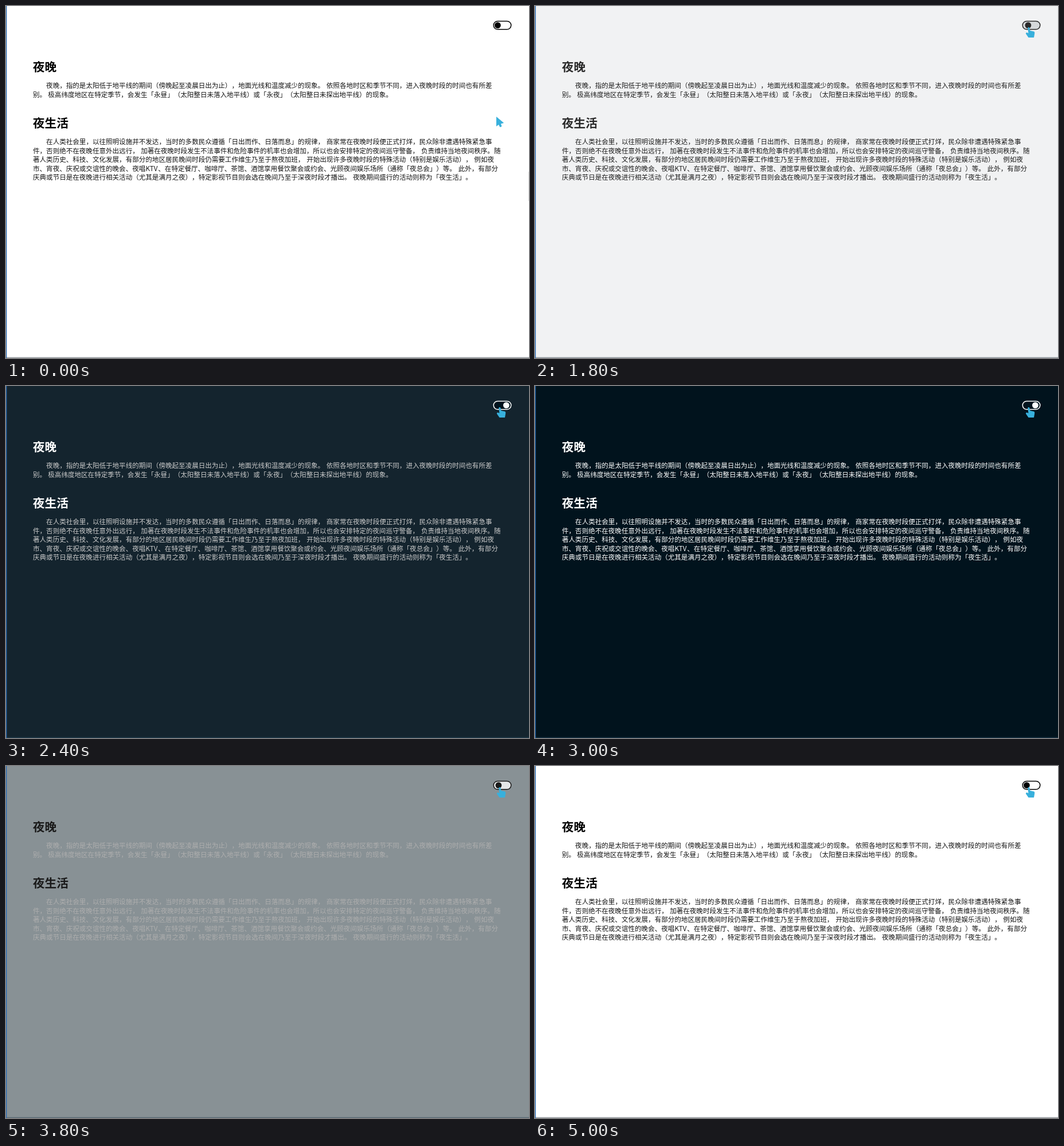
These frames come from a looping animation (912 by 614 pixels, 5200 ms). An HTML page:

```html
<!DOCTYPE html>
<html lang="zh-CN">
<head>
<meta charset="utf-8">
<title>夜晚</title>
<style>
  html, body { margin: 0; width: 100%; height: 100%; overflow: hidden; background: #fff; }
  svg { display: block; width: 912px; height: 614px; }
  text { font-family: "Noto Sans CJK SC", "Noto Sans CJK", sans-serif; text-spacing-trim: space-all; }
  .head { font-size: 20.7px; font-weight: 700; }
  .para { font-size: 11.56px; }
</style>
</head>
<body>
<svg viewBox="0 0 912 614">
  <rect id="page" width="912" height="614"/>
  <rect id="rule" y="612.6" width="912" height="1.4"/>
  <rect width="1.3" height="614" fill="#2a6cb5"/>
  <rect id="thumb" x="911" y="289" width="1" height="51" fill="#dcdcdc"/>
  <g id="heads" class="head">
    <text x="46.8" y="113.8">夜晚</text>
    <text x="46.8" y="211.6">夜生活</text>
  </g>
  <g id="paras" class="para"></g>
  <rect id="pill" x="850.2" y="26.4" width="30.6" height="14.4" rx="7.2" stroke-width="1.5"/>
  <circle id="knob" cy="33.6" r="5.4"/>
  <g id="cursor" fill="#38b0dc">
    <path id="arrow" d="M0 0V17L4 14L6.5 18.5L9.6 17L8 12.6L13.2 11Z"/>
    <path id="hand" d="M-1.8 1Q-.3-.8 1.4 1L2.4 6L9.2 7.4Q10.8 8.2 10.2 11L9 18H-.5L-5 11.6Q-5.4 9.2-3 9.2L-.6 10.6Z"/>
  </g>
</svg>
<script>
const LOOP = 5200, STEP = 200;
const TO_DARK = 1730, TO_LIGHT = 3490;
const CURSOR_ARRIVES = 1400;
const EM = 11.56, LEFT = 47, LEADING = 15.4, SPACE = 3.2, KTV_WIDTH = 21.8;
const $ = id => document.getElementById(id);

const paragraphs = [
  { y: 143.4, lines: [
    '夜晚，指的是太阳低于地平线的期间（傍晚起至凌晨日出为止），地面光线和温度减少的现象。 依照各地时区和季节不同，进入夜晚时段的时间也有所差',
    '别。 极高纬度地区在特定季节，会发生「永昼」（太阳整日未落入地平线）或「永夜」（太阳整日未探出地平线）的现象。'
  ] },
  { y: 241.3, lines: [
    '在人类社会里，以往照明设施并不发达，当时的多数民众遵循「日出而作、日落而息」的规律， 商家常在夜晚时段便正式打烊，民众除非遭遇特殊紧急事',
    '件，否则绝不在夜晚任意外出远行， 加著在夜晚时段发生不法事件和危险事件的机率也会增加，所以也会安排特定的夜间巡守警备， 负责维持当地夜间秩序。随',
    '著人类历史、科技、文化发展，有部分的地区居民晚间时段仍需要工作维生乃至于熬夜加班， 开始出现许多夜晚时段的特殊活动（特别是娱乐活动）， 例如夜',
    '市、宵夜、庆祝或交谊性的晚会、夜唱KTV、在特定餐厅、咖啡厅、茶馆、酒馆享用餐饮聚会或约会、光顾夜间娱乐场所（通称「夜总会」）等。 此外，有部分',
    '庆典或节日是在夜晚进行相关活动（尤其是满月之夜），特定影视节目则会选在晚间乃至于深夜时段才播出。 夜晚期间盛行的活动则称为「夜生活」。'
  ] }
];

// Full-width runs advance by whole ems; spaces and Latin text have their own widths.
function addLine(line, x, y) {
  for (const run of line.split(/( |KTV)/)) {
    if (run === ' ') { x += SPACE; continue; }
    const text = document.createElementNS('http://www.w3.org/2000/svg', 'text');
    text.setAttribute('x', x);
    text.setAttribute('y', y);
    text.textContent = run;
    $('paras').append(text);
    x += run === 'KTV' ? KTV_WIDTH : run.length * EM;
  }
}
for (const { y, lines } of paragraphs)
  lines.forEach((line, i) => addLine(line, LEFT + (i ? 0 : 2 * EM), y + i * LEADING));

const clamp = p => Math.min(1, Math.max(0, p));
const lerp = (a, b, p) => a + (b - a) * p;
const mix = (from, to, p) => `rgb(${from.map((v, i) => Math.round(lerp(v, to[i], p)))})`;
const bezier = (a, b, c, d, u) =>
  (1 - u) ** 3 * a + 3 * (1 - u) ** 2 * u * b + 3 * (1 - u) * u * u * c + u ** 3 * d;

// The CSS "ease" curve, solved by bisection.
function ease(p) {
  p = clamp(p);
  let low = 0, high = 1;
  for (let i = 0; i < 20; i++) {
    const mid = (low + high) / 2;
    if (bezier(0, 0.25, 0.25, 1, mid) < p) low = mid; else high = mid;
  }
  return bezier(0, 0.1, 1, 1, high);
}

// 0 in the light theme, 1 in the dark theme.
const darkness = (t, duration) => ease((t - TO_DARK) / duration) - ease((t - TO_LIGHT) / duration);

const white = [255, 255, 255], black = [0, 0, 0], night = [1, 19, 29];

// A wide swing down and left, then a straight run to the toggle.
function cursorAt(t) {
  const swing = clamp(t / 1000), run = clamp((t - 1000) / (CURSOR_ARRIVES - 1000));
  return [
    lerp(bezier(855, 600, 210, 655, swing), 861, run),
    lerp(bezier(193, 780, 50, 39, swing), 37, run)
  ];
}

function draw(time) {
  const t = Math.floor(time % LOOP / STEP) * STEP;
  const slow = darkness(t, 1000), fast = darkness(t, 500), lagging = darkness(t, 1400);
  const ink = mix(black, white, fast);
  const onToggle = t >= CURSOR_ARRIVES;

  $('page').setAttribute('fill', mix(white, night, slow));
  $('rule').setAttribute('fill', mix([150, 156, 160], [20, 48, 66], slow));
  $('heads').setAttribute('fill', ink);
  $('paras').setAttribute('fill', mix([20, 20, 20], white, lagging));
  $('pill').setAttribute('fill', mix(white, night, fast));
  $('pill').setAttribute('stroke', ink);
  $('knob').setAttribute('fill', ink);
  $('knob').setAttribute('cx', lerp(857.4, 872.4, fast));
  $('cursor').setAttribute('transform', `translate(${cursorAt(t)})`);
  $('arrow').style.display = onToggle ? 'none' : '';
  $('hand').style.display = onToggle ? '' : 'none';
  $('thumb').style.display = t < TO_DARK ? '' : 'none';
}

const start = performance.now();
function tick() {
  draw(performance.now() - start);
  requestAnimationFrame(tick);
}
tick();
</script>
</body>
</html>
```
